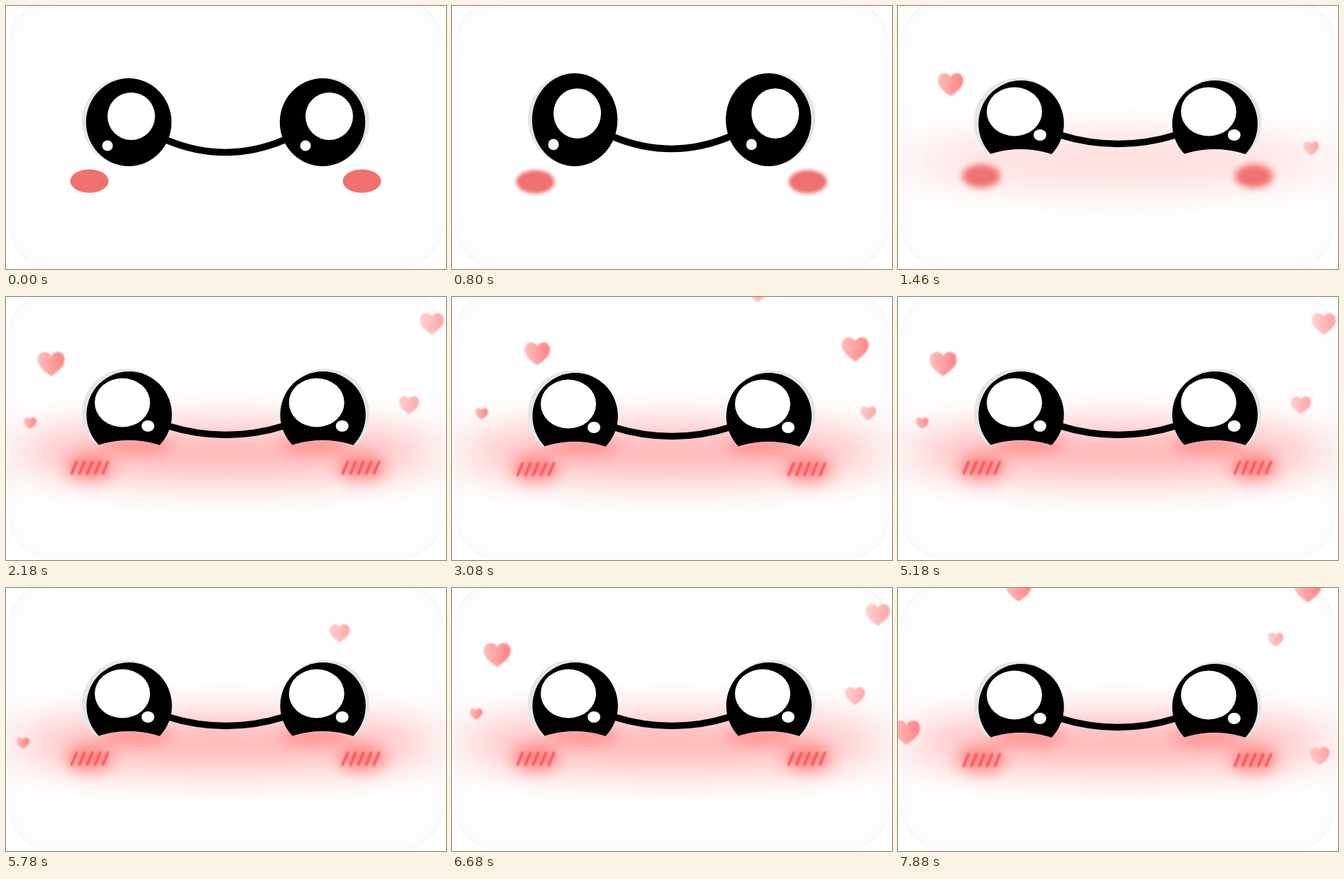
Animation, 620 px wide and 371 px high, one loop 8 s. Source, as an HTML page with a canvas:

```html
<!DOCTYPE html>
<html lang="en">
<head>
<meta charset="utf-8">
<title>Blushing face</title>
<style>
  html, body { margin: 0; width: 100%; height: 100%; overflow: hidden; background: #fff; }
  .card {
    position: absolute; left: 4px; top: -8px; width: 612px; height: 378px;
    border-radius: 62px; background: #fff;
    box-shadow: inset 0 0 34px rgba(0, 0, 0, .04), inset 0 0 1px rgba(0, 0, 0, .12);
  }
  canvas { position: absolute; left: 0; top: 0; }
</style>
</head>
<body>
<div class="card"></div>
<canvas id="stage" width="620" height="371"></canvas>
<script>
const ctx = document.getElementById('stage').getContext('2d');
const LOOP = 8000, BEAT = 300, CYCLE = 5;
const LOVE = 1460;      // first hearts appear
const FLUSH = 2180;     // blush is complete, beat 0 of the heart cycle
const LIFE = 1.4;       // beats a heart lives
const CHEEKS = [117.5, 501.5];

// The picture holds still for a while: start of each stretch and its hold.
const HOLDS = [[0, 500], [500, 100], [950, 130], [LOVE, 210], [1880, BEAT]];

// Hearts: birth beat, start, end, width
const HEARTS = [
  [0, 34, 178, 50, 110, 18],
  [0, 600, 38, 590, -30, 34],
  [1.8, 10, 230, 35, 154, 18],
  [2, 470, 64, 389, -34, 29],
  [2.6, 74, 111, 170, 3, 36],
  [2.6, 582, 201, 532, 73, 22],
  [3, 568, 74, 555, -25, 38],
  [4, 12, 204, 58, 51, 38],
  [4, 594, 237, 531, 119, 28]
];

const lerp = (a, b, k) => a + (b - a) * k;
const ease = (t, from, to) => {
  const u = Math.min(1, Math.max(0, (t - from) / (to - from)));
  return u * u * (3 - 2 * u);
};

function hold(now) {
  const [start, step] = HOLDS.filter(h => h[0] <= now).pop();
  return start + Math.floor((now - start) / step) * step;
}

function oval(x, y, rx, ry, fill) {
  ctx.fillStyle = fill;
  ctx.beginPath();
  ctx.ellipse(x, y, rx, ry, 0, 0, Math.PI * 2);
  ctx.fill();
}

// Runs paint with its own opacity, blur and transform.
function layer(alpha, blur, paint) {
  if (alpha <= 0) return;
  ctx.save();
  ctx.globalAlpha = alpha;
  if (blur > 0) ctx.filter = `blur(${blur}px)`;
  paint();
  ctx.restore();
}

const heartPath = new Path2D('M0 .45C-.2 .3-.5 .12-.5-.17C-.5-.36-.36-.45-.25-.45C-.12-.45-.04-.38 0-.3C.04-.38 .12-.45 .25-.45C.36-.45 .5-.36 .5-.17C.5 .12 .2 .3 0 .45Z');
const heartFill = ctx.createLinearGradient(-.5, 0, .5, 0);
heartFill.addColorStop(0, '#ffbaba');
heartFill.addColorStop(1, '#ff7c7c');

function drawHearts(t) {
  const beat = (t - FLUSH) / BEAT;
  for (const [birth, x0, y0, x1, y1, w] of HEARTS) {
    const age = (beat - birth + 2 * CYCLE + 1e-6) % CYCLE;
    if (age > LIFE + .01 || t - age * BEAT < LOVE - 1) continue;
    const u = age / LIFE;
    const faint = x0 > 400 && w < 36;
    layer(faint ? .68 : .95, .8, () => {
      ctx.translate(lerp(x0, x1, u) + 24 * Math.sin(Math.PI * u), lerp(y0, y1, u));
      ctx.scale(w, w);
      ctx.fillStyle = heartFill;
      ctx.fill(heartPath);
    });
  }
}

function drawCheekLines(x, y) {
  ctx.strokeStyle = '#ff5050';
  ctx.lineWidth = 3.6;
  ctx.lineCap = 'round';
  ctx.beginPath();
  for (let i = -2; i <= 2; i++) {
    ctx.moveTo(x + i * 11 - 3.5, y + 9);
    ctx.lineTo(x + i * 11 + 3.5, y - 7.5);
  }
  ctx.stroke();
}

function draw(t) {
  const stretch = ease(t, 400, 800);
  const joy = ease(t, 830, LOVE);
  const flush = ease(t, LOVE, FLUSH);
  const mix = (calm, happy) => lerp(calm, happy, joy);
  const lift = stretch * (1 - joy);
  const cheekY = mix(247, 240) + lift;
  const lid = mix(240, 202);
  const sway = Math.cos(((t - FLUSH) / BEAT - 1) * 2 * Math.PI / CYCLE);
  const bob = flush * Math.round(.4 - 2 * sway);

  function eye(side) {
    const x = side ? 446 : 173, rim = side ? 450 : 169;
    const shift = side * mix(279, 273.7);
    ctx.save();
    ctx.beginPath();
    ctx.moveTo(x - 74, 0);
    ctx.lineTo(x - 74, lid + 20);
    ctx.quadraticCurveTo(x, lid - 20, x + 74, lid + 20);
    ctx.lineTo(x + 74, 0);
    ctx.clip();
    // The eye stretches upwards from its lower edge.
    ctx.translate(0, 226);
    ctx.scale(1, 1 + .056 * lift);
    ctx.translate(0, -226);
    oval(rim, mix(163, 163.5), 62, 62, '#e6e6e6');
    oval(x + .6 * joy, mix(164, 166), 60.2, mix(62, 61), '#000');
    oval(mix(176.5, 164) + shift, mix(155.5, 149), mix(33.5, 39), mix(33.5, 34.5), '#fff');
    oval(mix(143, 200) + shift, mix(197, 182), mix(7.5, 9), mix(7.5, 8), '#fff');
    ctx.restore();
  }

  function smile() {
    const x = mix(309, 310), y = mix(189, 181.5) - 5 * lift;
    ctx.strokeStyle = '#000';
    ctx.lineWidth = 9.5;
    ctx.beginPath();
    ctx.moveTo(x - 83, y);
    ctx.quadraticCurveTo(x, y + mix(35, 26), x + 83, y);
    ctx.stroke();
  }

  ctx.clearRect(0, 0, 620, 371);
  layer(.4 * joy + .46 * flush, 29, () => oval(310, 219, 305, 35, '#ff9f9f'));
  ctx.save();
  ctx.translate(0, bob);
  for (const x of CHEEKS) {
    layer(1 - flush, 2.5 * (stretch + joy), () => oval(x, cheekY, 27, 16.5, '#f07270'));
    layer(.7 * flush, 11, () => oval(x, cheekY, 34, 19, '#ff6a6a'));
  }
  for (const x of [183, 436]) layer(.55 * flush, 10, () => oval(x, lid + 7, 52, 13, '#ff7070'));
  for (const x of [118, 500]) layer(flush, .8, () => drawCheekLines(x, cheekY));
  ctx.restore();
  drawHearts(t);
  ctx.save();
  ctx.translate(0, bob);
  smile();
  eye(0);
  eye(1);
  ctx.restore();
}

let shown = -1;
function tick() {
  const t = hold(performance.now() % LOOP);
  if (t !== shown) draw(shown = t);
  requestAnimationFrame(tick);
}
tick();
</script>
</body>
</html>
```
